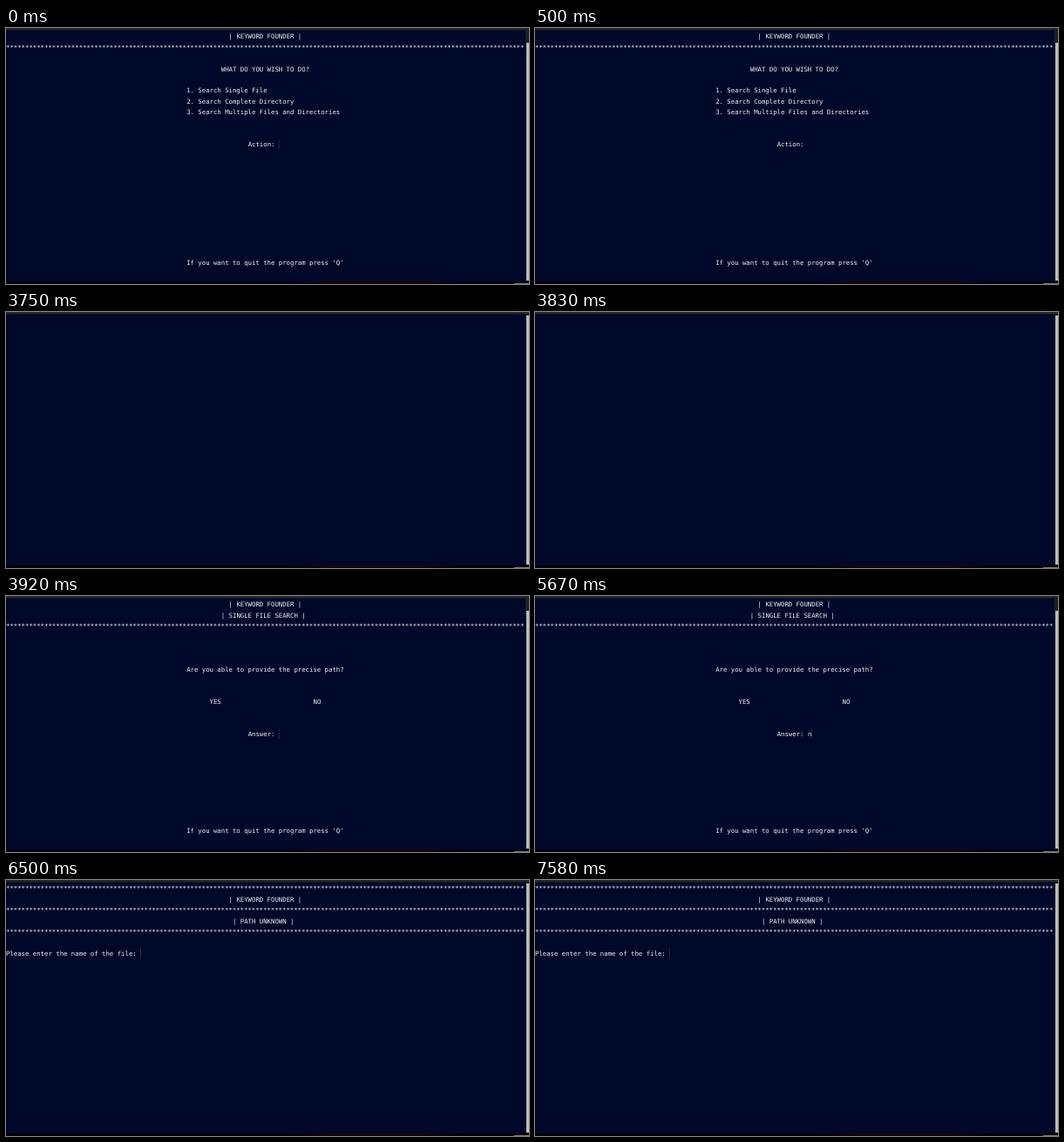
An HTML page that plays this animation: 600 by 294 pixels, repeating every 8 s.

```html
<!DOCTYPE html>
<html lang="en">
<head>
<meta charset="utf-8">
<title>Keyword search terminal</title>
<style>
  html, body { margin: 0; width: 100%; height: 100%; overflow: hidden; background: #00082a; }
  svg { display: block; width: 100%; height: 100%; }
  text {
    font-family: "DejaVu Sans Mono", monospace;
    font-size: 7.32px;
    fill: #f0f0f0;
    white-space: pre;
    text-rendering: geometricPrecision;
  }
</style>
</head>
<body>
<svg id="stage" viewBox="0 0 600 294">
  <defs>
    <linearGradient id="glow">
      <stop offset="0" stop-color="#260208" stop-opacity="0"/>
      <stop offset=".25" stop-color="#260208"/>
      <stop offset=".8" stop-color="#260208"/>
      <stop offset="1" stop-color="#260208" stop-opacity="0"/>
    </linearGradient>
  </defs>
  <rect width="600" height="294" fill="#00082a"/>
  <rect width="600" height="2.5" fill="#262624"/>
  <rect y="291" width="600" height="3" fill="#030308"/>
  <rect x="320" y="291.5" width="200" height="1.5" fill="url(#glow)"/>
  <rect x="583" y="293" width="17" height="1" fill="#77777a"/>
  <rect x="596" y="2.5" width="4" height="288.5" fill="#1d1e25"/>
  <rect id="thumb" x="597" width="3" fill="#bdbdbd"/>
  <g id="screen"></g>
  <text id="typed"></text>
  <rect id="cursor" width="0.8" height="11" fill="#2b3047"/>
</svg>
<script>
const LOOP = 8000, COL = 4.407, ROW = 12.375, BASE = 12.4;
const $ = id => document.getElementById(id);
const STARS = "*".repeat(135);
const QUIT = [21, 47, "If you want to quit the program press 'Q'"];

// Lines are [row, column, text]; input is where typing starts.
const screens = {
  menu: {
    thumb: 17, input: [10, 71],
    lines: [
      [0, 58, "| KEYWORD FOUNDER |"],
      [1, 0, STARS],
      [3, 56, "WHAT DO YOU WISH TO DO?"],
      [5, 47, "1. Search Single File"],
      [6, 47, "2. Search Complete Directory"],
      [7, 47, "3. Search Multiple Files and Directories"],
      [10, 63, "Action:"],
      QUIT
    ]
  },
  blank: { thumb: 4, input: [0, 0], lines: [] },
  single: {
    thumb: 17, input: [12, 71],
    lines: [
      [0, 58, "| KEYWORD FOUNDER |"],
      [1, 56, "| SINGLE FILE SEARCH |"],
      [2, 0, STARS],
      [6, 47, "Are you able to provide the precise path?"],
      [9, 53, "YES"],
      [9, 80, "NO"],
      [12, 63, "Answer:"],
      QUIT
    ]
  },
  unknown: {
    thumb: 4, input: [6, 35],
    lines: [
      [0, 0, STARS],
      [1, 58, "| KEYWORD FOUNDER |"],
      [2, 0, STARS],
      [3, 59, "| PATH UNKNOWN |"],
      [4, 0, STARS],
      [6, 0, "Please enter the name of the file:"]
    ]
  }
};

// [start ms, screen, typed text, cursor visible]
const steps = [
  [0, "menu", "", true],
  [170, "menu", "", false],
  [3170, "menu", "1", true],
  [3670, "blank", "", false],
  [3920, "single", "", true],
  [5670, "single", "n", true],
  [6170, "single", "n", false],
  [6500, "unknown", "", true],
  [6920, "unknown", "", false],
  [7580, "unknown", "", true]
];

function place(el, row, col, text) {
  el.setAttribute("x", col * COL);
  el.setAttribute("y", BASE + row * ROW);
  el.textContent = text;
  return el;
}

for (const [name, { lines }] of Object.entries(screens)) {
  const group = document.createElementNS("http://www.w3.org/2000/svg", "g");
  group.id = name;
  for (const line of lines) {
    group.append(place(document.createElementNS(group.namespaceURI, "text"), ...line));
  }
  $("screen").append(group);
}

function show([, name, typed, cursorOn]) {
  const { thumb, input: [row, col] } = screens[name];
  for (const key in screens) $(key).style.display = key === name ? "" : "none";
  place($("typed"), row, col, typed);
  $("thumb").setAttribute("y", thumb);
  $("thumb").setAttribute("height", 290 - thumb);
  $("cursor").setAttribute("x", (col + typed.length) * COL - 0.1);
  $("cursor").setAttribute("y", row * ROW + 4.2);
  $("cursor").style.display = cursorOn ? "" : "none";
}

let current;
const begin = performance.now();
function tick() {
  const time = (performance.now() - begin) % LOOP;
  const step = steps.findLast(s => s[0] <= time);
  if (step !== current) show(current = step);
  requestAnimationFrame(tick);
}
tick();
</script>
</body>
</html>
```
